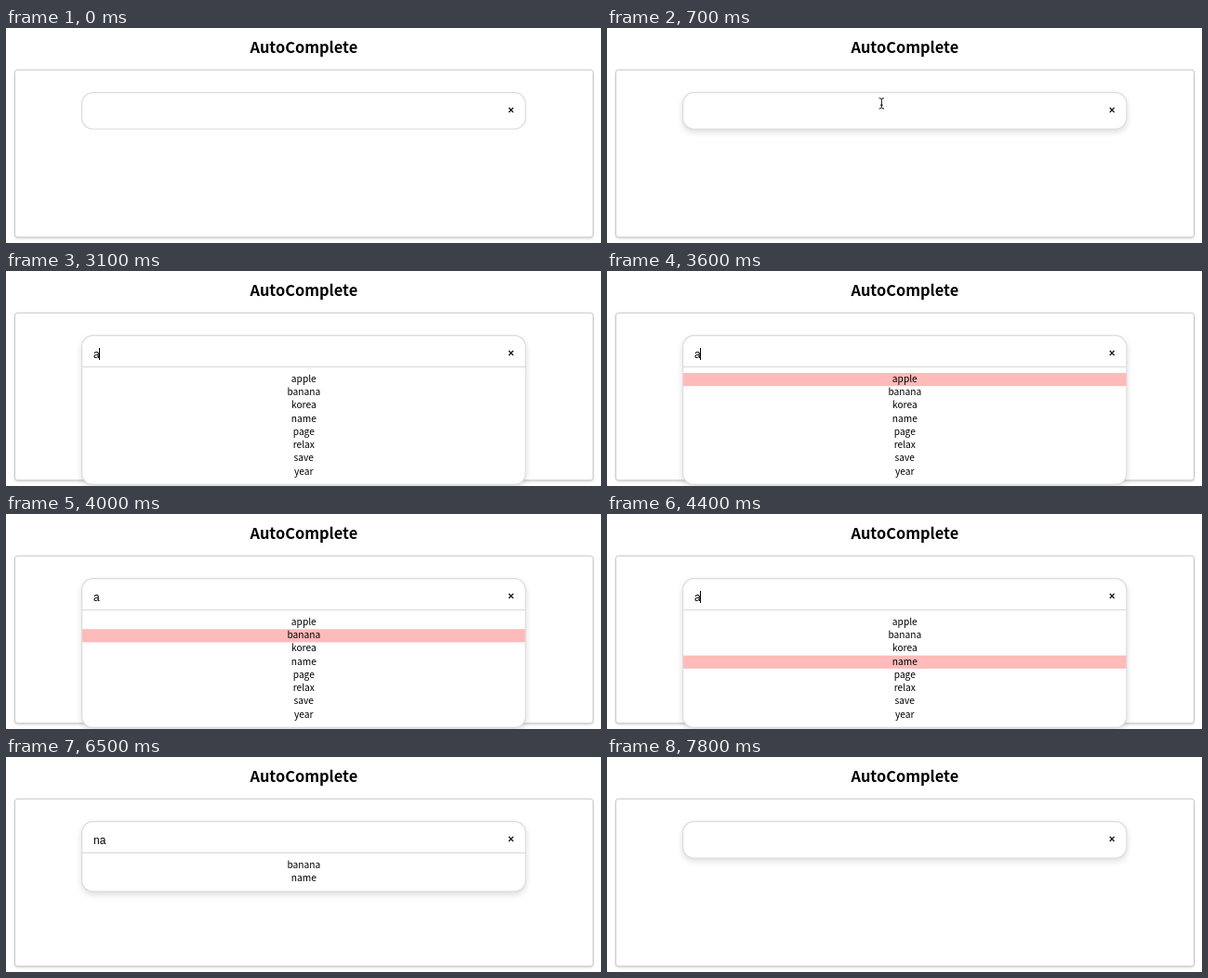
An HTML page for the animation above (8000 ms loop, 640 by 232 pixels).

```html
<!DOCTYPE html>
<html lang="en">
<head>
<meta charset="utf-8">
<title>AutoComplete</title>
<style>
  html, body { margin: 0; width: 100%; height: 100%; overflow: hidden; background: #fff; }
  svg { display: block; width: 640px; height: 232px; }
  text { fill: #000; font-family: "Noto Sans CJK KR", "Noto Sans CJK JP", "Noto Sans", sans-serif; }
  .title { font-size: 16.4px; font-weight: 700; text-anchor: middle; }
  .row { font-size: 10.2px; text-anchor: middle; }
  .value { font: 12px "Liberation Sans", Arial, sans-serif; }
  .panel { fill: #fff; stroke: #c8c8c8; filter: drop-shadow(0 1px 1px rgba(0, 0, 0, .16)); }
  .box { fill: #fff; stroke: #dcdcde; stroke-width: 1.2; }
  .box.raised { filter: drop-shadow(0 3px 3px rgba(0, 0, 0, .13)); }
</style>
</head>
<body>
<svg viewBox="0 0 640 232">
  <text class="title" x="320.3" y="27">AutoComplete</text>
  <rect class="panel" x="9.5" y="45.2" width="622" height="180.6" rx="3"/>
  <rect class="box" id="box" x="81.6" y="69.7" width="477.3" height="39.3" rx="12"/>
  <rect id="mark" x="82.1" width="476.5" height="14.2" fill="#ffbaba"/>
  <path id="line" d="M82 103.5H558.6" stroke="#d8d8da"/>
  <g id="rows"></g>
  <text class="value" id="value" x="94" y="93.6"></text>
  <rect id="caret" y="83" width="1" height="13"/>
  <path d="M540.8 86L545.6 91M545.6 86L540.8 91" stroke="#111" stroke-width="1.15"/>
  <path id="arrow" d="M0 0V11.2L2.6 8.8L4.3 12.6L6.3 11.8L4.7 8H8.4Z" stroke="#fff" stroke-width=".8"/>
  <path id="beam" d="M-2.7 -5.7Q0 -5.7 0 -4Q0 -5.7 2.7 -5.7M0 -4V4M-2.7 5.7Q0 5.7 0 4Q0 5.7 2.7 5.7M-1.4 1.8H1.4" fill="none" stroke="#111"/>
</svg>
<script>
const LOOP = 8000, STEP = 100, ROW = 14.22, LIST_TOP = 110;
const WORDS = ["apple", "banana", "korea", "name", "open", "page", "relax", "save", "year"];
const $ = id => document.getElementById(id);

// [time, typed value]
const TYPING = [[0, ""], [2200, "a"], [4700, "name"], [6300, "nam"], [6500, "na"], [6700, "n"], [6800, ""]];
// [time, highlighted row]
const PICKS = [[0, -1], [3600, 0], [3900, 1], [4200, 2], [4400, 3], [4700, -1]];
// caret toggles, starting hidden
const BLINKS = [1200, 1400, 1600, 2600, 3100, 4000, 4300, 5200, 5300, 5800, 6800, 7200, 7300, 7800];

const rows = WORDS.slice(1).map((_, i) => {
  const el = document.createElementNS("http://www.w3.org/2000/svg", "text");
  el.setAttribute("class", "row");
  el.setAttribute("x", 320.3);
  el.setAttribute("y", LIST_TOP + 10 + i * ROW);
  $("rows").append(el);
  return el;
});

const measure = document.createElement("canvas").getContext("2d");
measure.font = '12px "Liberation Sans", Arial, sans-serif';

const latest = (list, t) => list.filter(e => e[0] <= t).pop()[1];
const show = (el, on) => el.setAttribute("visibility", on ? "visible" : "hidden");
const bezier = (a, b, c, p) => a * (1 - p) ** 2 + 2 * b * p * (1 - p) + c * p * p;

function drawPointer(t) {
  const p = Math.min(1, Math.max(0, (t - 200) / 900));
  const e = p * p * (3 - 2 * p);
  const x = bezier(467.5, 310, 186.3, e), y = bezier(215.5, 30, 86.3, e);
  const inside = x > 82 && x < 559 && y > 70 && y < 109;
  const on = t >= 100 && t < 2200;
  for (const id of ["arrow", "beam"]) {
    $(id).setAttribute("transform", `translate(${x} ${y})`);
    show($(id), on && inside === (id === "beam"));
  }
  $("box").classList.toggle("raised", inside);
}

function draw(ms) {
  const t = Math.floor(ms / STEP) * STEP;
  const value = latest(TYPING, t), pick = latest(PICKS, t);
  const found = value ? WORDS.filter(w => w.includes(value)) : [];
  const bottom = found.length ? LIST_TOP + found.length * ROW + 6.6 : 109;

  $("box").setAttribute("height", bottom - 69.7);
  show($("line"), found.length > 0);
  rows.forEach((el, i) => el.textContent = found[i] || "");
  show($("mark"), pick >= 0);
  $("mark").setAttribute("y", LIST_TOP + Math.max(0, pick) * ROW);

  $("value").textContent = value;
  $("caret").setAttribute("x", Math.floor(94 + measure.measureText(value).width));
  show($("caret"), BLINKS.filter(b => b <= t).length % 2 === 1);
  drawPointer(t);
}

const start = performance.now();
function tick() {
  draw((performance.now() - start) % LOOP);
  requestAnimationFrame(tick);
}
tick();
</script>
</body>
</html>
```
